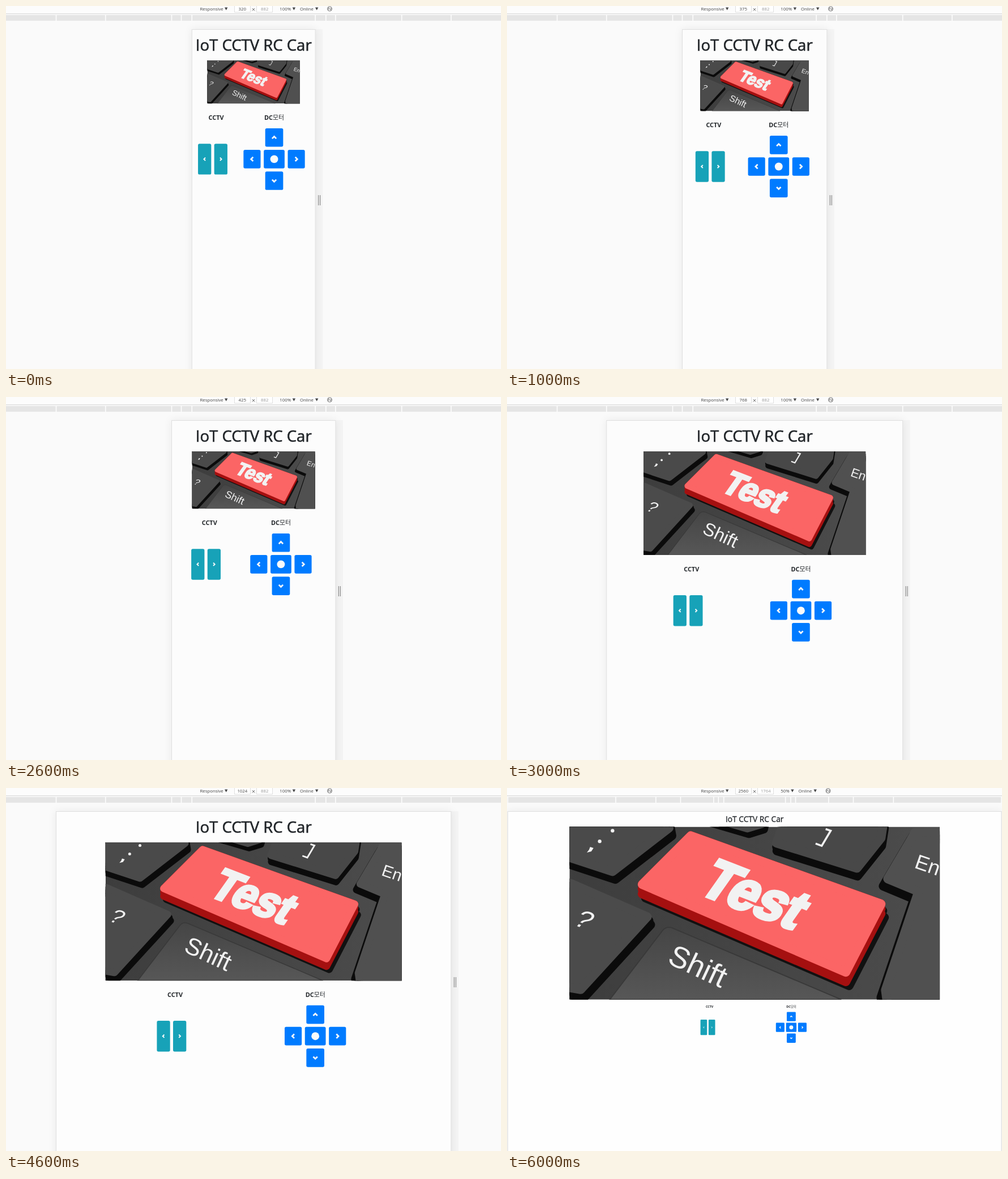
Write an HTML page that moves like this. It is 874 by 641 pixels and loops after 7 s.

```html
<!DOCTYPE html>
<html lang="en">
<head>
<meta charset="utf-8">
<title>Responsive preview</title>
<style>
html, body { margin: 0; width: 100%; height: 100%; overflow: hidden; background: #fafafa; }
svg { display: block; width: 874px; height: 641px; }
text { white-space: pre; }
.ui { font: 7.8px "Open Sans", sans-serif; fill: #444; }
.mid { text-anchor: middle; }
.title { font: 40.4px "Open Sans", sans-serif; fill: #212529; stroke: #212529; stroke-width: .9; }
.label { font: bold 16px "Open Sans", sans-serif; fill: #212529; }
.ko { font-family: "Noto Sans CJK KR", "Noto Sans CJK", sans-serif; font-weight: 500; }
.key { font-family: "Liberation Sans", Arial, sans-serif; fill: #f2f2f2; }
.page { stroke: #dfdfdf; filter: drop-shadow(0 0 7px rgba(0,0,0,.07)); }
.round { stroke-width: 16; stroke-linejoin: round; }
</style>
</head>
<body>
<svg viewBox="0 0 874 641">
  <defs>
    <linearGradient id="face" x1="0" y1="0" x2="0" y2="1">
      <stop offset="0" stop-color="#454545"/><stop offset="1" stop-color="#575757"/>
    </linearGradient>
    <linearGradient id="base" x1="0" y1="0" x2="1" y2="0">
      <stop offset="0" stop-color="#3d3d3d"/><stop offset="1" stop-color="#4c4c4c"/>
    </linearGradient>
    <linearGradient id="side" x1="0" y1="0" x2="0" y2="1">
      <stop offset="0" stop-color="#7a0c0c"/><stop offset="1" stop-color="#d01616"/>
    </linearGradient>
    <clipPath id="crop"><rect width="662" height="309"/></clipPath>
  </defs>

  <rect width="874" height="641" fill="#fafafa"/>
  <rect id="strip" y="41" width="13" height="600" fill="#f4f4f4"/>
  <rect id="page" class="page" y="41.5" height="640"/>
  <path id="grip" d="M5.5 334v18M8.5 334v18" stroke="#8a8a8a" stroke-width="1.2"/>

  <g id="site">
    <text class="title mid" y="56.5">IoT CCTV RC Car</text>
    <g id="photo"><g clip-path="url(#crop)">
      <rect width="662" height="309" fill="url(#base)"/>
      <g id="keys"></g>
      <g fill="#f2f2f2">
        <circle cx="77" cy="7" r="3.2"/><circle cx="54" cy="26" r="3.2"/>
        <path d="M37 36l6 2-4 6-8 2 4-5z"/>
      </g>
      <path d="M440 30l11 4 16-27-9-3" fill="none" stroke="#f2f2f2" stroke-width="3.6"/>
      <text class="key" font-size="50" transform="matrix(.9 .35 -.6 .75 4 174)">?</text>
      <text class="key" font-size="54" transform="translate(173 243) rotate(25)">Shift</text>
      <text class="key" font-size="37" transform="translate(615 73) rotate(19)">En</text>
      <text class="key" font-size="100" font-weight="bold" stroke="#f2f2f2" stroke-width="6"
        transform="matrix(.87 .337 -.6 .85 226 117)">Test</text>
    </g></g>
    <g id="cctv"><text class="label mid" y="42.1">CCTV</text></g>
    <g id="motor"><text class="label mid" y="42.1">DC<tspan class="ko">모터</tspan></text></g>
  </g>

  <rect width="874" height="13.5" fill="#fcfcfc"/>
  <rect y="13.3" width="874" height="1.2" fill="#d2d2d2"/>
  <rect y="14.5" width="874" height="12" fill="#fbfbfb"/>
  <rect y="16" width="874" height="10" fill="#e5e5e5"/>
  <path id="marks" stroke="#fdfdfd" stroke-width="1.6"/>

  <g class="ui">
    <text x="342.5" y="8.2">Responsive</text>
    <path d="M386 2.5h5.4l-2.7 5z"/>
    <path d="M403.5 -1v12h28v-12M442.5 -1v12h28v-12" fill="#fff" stroke="#dedede"/>
    <text id="wide" class="mid" x="417.3" y="8.2"></text>
    <path d="M434.8 4l4.4 4.4m0-4.4l-4.4 4.4" stroke="#555" stroke-width=".9"/>
    <text id="high" class="mid" x="456.8" y="8.2" style="fill:#999"></text>
    <text id="zoom" x="483.3" y="8.2"></text>
    <g id="net">
      <path d="M-13.3 2.5h5.4l-2.7 5z"/>
      <text x="0" y="8.2">Online</text>
      <path d="M27 2.5h5.4l-2.7 5z"/>
      <g fill="none" stroke="#666" stroke-width=".9">
        <circle cx="52.5" cy="5" r="4"/>
        <path d="M49.7 2.2l5.6 5.6M51 6.8l-1.4-1.8 1.8-1.4M54 3.2l1.4 1.8-1.8 1.4"/>
      </g>
    </g>
  </g>
</svg>
<script>
const $ = id => document.getElementById(id);
const MID = 437.2, TOP = 41, UNIT = 0.681, HOLD = 1000;
const PRESETS = [320, 375, 425, 768, 1024, 1440, 2560];

// viewport width, height, zoom in percent, container width, page colour
const STATES = [
  [320, 882, 100, 320, '#fcfcfc'],
  [375, 882, 100, 375, '#fcfcfc'],
  [425, 882, 100, 425, '#fcfcfc'],
  [768, 882, 100, 720, '#fcfcfc'],
  [1024, 882, 100, 960, '#fdfdfd'],
  [1440, 980, 90, 1140, '#fefefe'],
  [2560, 1764, 50, 1140, '#fefefe']
];

function add(parent, tag, attrs) {
  const el = document.createElementNS('http://www.w3.org/2000/svg', tag);
  for (const name in attrs) el.setAttribute(name, attrs[name]);
  parent.appendChild(el);
  return el;
}

function button(parent, x, y, w, h, fill, angle, size) {
  add(parent, 'rect', { x: x - w / 2, y: y - h / 2, width: w, height: h, rx: 4, fill });
  if (angle === undefined) {
    add(parent, 'circle', { cx: x, cy: y, r: 10.2, fill: '#fafafa' });
    return;
  }
  add(parent, 'path', {
    d: 'M2.8 -5.4L-2.6 0L2.8 5.4', fill: 'none', stroke: '#fafafa', 'stroke-width': 4,
    transform: `translate(${x} ${y}) rotate(${angle}) scale(${size})`
  });
}

function keycap(points, fill, side, dx, dy) {
  const keys = $('keys');
  const shape = (colour, x, y) => add(keys, 'polygon', {
    points, fill: colour, stroke: colour, class: 'round', transform: `translate(${x} ${y})`
  });
  if (side) {
    shape(side, dx, dy);
    shape(side, dx / 2, dy / 2);
  }
  shape(fill, 0, 0);
}

function drawKeys() {
  const grey = '#4a4a4a', dark = '#0b0b0b';
  keycap('-20,-20 174,-20 178,2 77,80 -20,48', grey, dark, 5, 14);
  keycap('240,-30 350,-30 344,-6 318,2 250,-18', grey, dark, 3, 10);
  keycap('385,-12 370,29 514,74 557,20 562,-12', '#484848', dark, 1, 14);
  keycap('618,10 690,8 690,330 570,330 565,292 624,116 569,93', '#505050', dark, -8, 13);
  keycap('-20,95 4,102 139,161 20,291 -20,284', '#4b4b4b', dark, 6, 14);
  add($('keys'), 'path', {
    d: 'M72 309L166 186Q173 177 184 181L486 309Z',
    fill: 'url(#face)', stroke: '#393939', 'stroke-width': 2
  });
  const red = '217,16 130,103 494,260 557,138';
  keycap(red, '#111', '#111', 6, 24);
  keycap(red, '#c01414', '#a51010', 0, 17);
  keycap(red, '#fb6565');
}

function drawButtons() {
  const teal = '#17a2b8', blue = '#007bff';
  button($('cctv'), -30, 144, 34.2, 80, teal, 0, .72);
  button($('cctv'), 12, 144, 34.2, 80, teal, 180, .72);
  button($('motor'), 0, 88, 46.5, 48, blue, 90, 1);
  button($('motor'), -57.4, 144, 44.3, 48, blue, 0, 1);
  button($('motor'), 0, 144, 54, 48, blue);
  button($('motor'), 57.4, 144, 44.3, 48, blue, 180, 1);
  button($('motor'), 0, 200, 46.5, 48, blue, 270, 1);
}

function show([w, h, zoom, box, colour]) {
  const k = UNIT * zoom / 100, half = w * k / 2;
  const photoW = w * .75, below = 80.8 + photoW * 309 / 662;
  const place = (id, value) => $(id).setAttribute('transform', value);

  $('page').setAttribute('x', MID - half);
  $('page').setAttribute('width', half * 2);
  $('page').setAttribute('fill', colour);
  $('strip').setAttribute('x', MID + half);
  place('grip', `translate(${MID + half})`);

  place('site', `translate(${MID} ${TOP}) scale(${k})`);
  place('photo', `translate(${-photoW / 2} 80.8) scale(${photoW / 662})`);
  place('cctv', `translate(${-box / 6 - 43.7} ${below})`);
  place('motor', `translate(${box / 6} ${below})`);

  $('marks').setAttribute('d', PRESETS.map(p => {
    const d = p * k / 2;
    return `M${MID - d} 15v11.5M${MID + d} 15v11.5`;
  }).join(''));

  $('wide').textContent = w;
  $('high').textContent = h;
  $('zoom').textContent = zoom + '%';
  place('net', `translate(${zoom === 100 ? 519 : 514.5})`);
}

let current = -1;
function tick(now) {
  const i = Math.floor(now / HOLD) % STATES.length;
  if (i !== current) show(STATES[current = i]);
}

drawKeys();
drawButtons();
tick(0);
const start = performance.now();
requestAnimationFrame(function loop() {
  tick(Math.max(0, performance.now() - start));
  requestAnimationFrame(loop);
});
</script>
</body>
</html>
```
